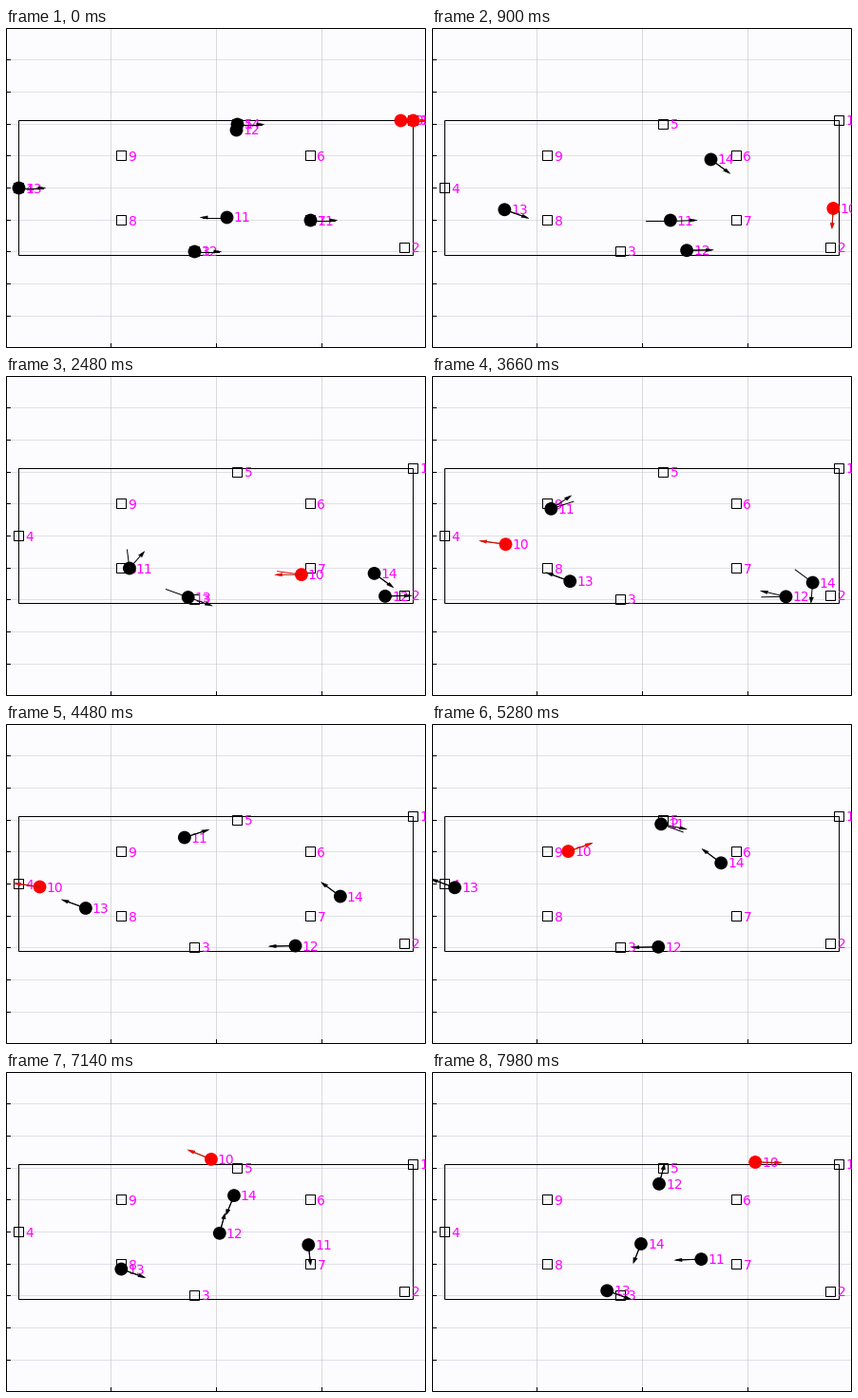
Write a matplotlib script that moves like this. It is 442 by 337 pixels and loops after 8000 ms.

```python
import math
import matplotlib.pyplot as plt
from matplotlib.animation import FuncAnimation
from matplotlib.patches import Circle, Polygon, Rectangle

W, H, DPI = 442, 337, 100
FRAMES, STEP = 400, 20
PX = 72 / DPI
PINK = "#ff00ff"
SPEED = 0.00375   # stage widths per frame, black agents
RATE = 0.0257     # share of the remaining way per frame, red agent
TURN = 0.18       # turning rate of every heading
REACH = 0.02      # a goal counts as met at this distance

NODES = {1: (428, 97), 2: (419, 231), 3: (198, 235), 4: (13, 168),
         5: (243, 101), 6: (320, 134), 7: (320, 202), 8: (121, 202),
         9: (121, 134)}

# agent: first node, goals as (node, frames to rest there), turning bias
PATROLS = {
    11: (7, [(8, 7), (9, 5), (5, 4), (6, 4), (7, 8), (8, 0)], 0),
    12: (3, [(2, 26), (3, 20), (5, 0)], 0.001),
    13: (4, [(3, 29), (4, 23), (3, 0)], 0.003),
    14: (5, [(2, 25), (5, 17), (5, 8), (3, 0)], -0.001),
}

# the red agent's goals as (place, distance at which it moves on)
CHASE = [(NODES[2], 0.0225), (NODES[4], 0.04), (NODES[5], 0.235),
         ((300, 82), 0.148), ((207, 88), 0.018), (NODES[1], 0)]


def walk(start, goals, pace, bias=0, rest=0):
    """States (x, y, aim, heading); goals are (place, reach, rest)."""
    x, y = start
    heading, k = 0.0, 0
    states = [(x, y, heading, heading)]
    while len(states) < FRAMES:
        (gx, gy), reach, pause = goals[k]
        dx, dy = (gx - x) / W, (y - gy) / H
        dist = math.hypot(dx, dy)
        if rest > 0:
            rest -= 1
        elif dist <= reach and k < len(goals) - 1:
            k, rest = k + 1, pause
        else:
            part = pace(dist) / dist
            x += (gx - x) * part
            y += (gy - y) * part
        (gx, gy), _, _ = goals[k]
        aim = math.atan2((y - gy) / H, (gx - x) / W)
        heading += TURN * (math.sin(aim - heading) + bias)
        states.append((x, y, aim, heading))
    return states


def ray(x, y, angle, along, side=0.0):
    c, s = math.cos(angle), math.sin(angle)
    return (x + W * (along * c - side * s), y - H * (along * s + side * c))


fig = plt.figure(figsize=(W / DPI, H / DPI), dpi=DPI, facecolor="#fcfcfe")
ax = fig.add_axes([0, 0, 1, 1])
ax.set_xlim(0, W)
ax.set_ylim(H, 0)
ax.axis("off")


def line(xs, ys, color="black", z=1, **kw):
    return ax.plot(xs, ys, color=color, lw=PX, zorder=z, **kw)[0]


def label(x, y, n):
    return ax.text(x + 7.5, y + 5.5, str(n), color=PINK, size=10,
                   family="DejaVu Sans", va="baseline", zorder=2,
                   clip_on=True)


class Agent:
    def __init__(self, n, arrow=True):
        color, edge = ("red", "#b01c08") if n == 10 else ("black", "black")
        self.dot = ax.add_patch(Circle((0, 0), 6.9, fc=color, lw=0, zorder=3))
        self.text = label(0, 0, n)
        self.aim = line([], [], color, 4)
        self.shaft = line([], [], edge, 4)
        self.head = ax.add_patch(Polygon([(0, 0)] * 3, fc=color, ec=edge,
                                         lw=0.3, zorder=4))
        self.arrow = [self.aim, self.shaft, self.head] if arrow else []
        self.parts = [self.dot, self.text] + self.arrow

    def place(self, x, y, aim, heading):
        x, y = x + 0.5, y + 0.5
        self.dot.center = (x, y)
        self.text.set_position((x + 7, y + 5))
        if not self.arrow:
            return
        for part, angle in ((self.aim, aim), (self.shaft, heading)):
            part.set_data(*zip((x, y), ray(x, y, angle, 0.058)))
        self.head.set_xy([ray(x, y, heading, 0.064),
                          ray(x, y, heading, 0.046, 0.005),
                          ray(x, y, heading, 0.046, -0.005)])

    def show(self, on):
        for part in self.parts:
            part.set_visible(on)


# grid, ticks and border
DOTS = (0, (1, 1))
for k in range(1, 4):
    x = round(k * W / 4)
    line([x, x], [0, H], "#b8b8b8", 0, ls=DOTS)
    line([x, x], [H - 5, H])
for k in range(1, 10):
    y = int(k * H / 10)
    line([0, W], [y, y], "#c4c4d4", 0, ls=DOTS)
    line([0, 4], [y, y])
ax.add_patch(Rectangle((0, 0), W - 1, H - 1, fill=False, lw=PX))

# area and nodes
ax.add_patch(Rectangle((13, 97), 415, 142, fill=False, lw=PX, zorder=1))
for n, (x, y) in NODES.items():
    ax.add_patch(Rectangle((x - 5, y - 5), 10, 10, fill=False, lw=PX,
                           zorder=2))
    label(x, y, n)

states = {10: walk(NODES[1], [(p, reach, 0) for p, reach in CHASE],
                   lambda dist: RATE * dist)}
for n, (first, goals, bias) in PATROLS.items():
    states[n] = walk(NODES[first], [(NODES[g], REACH, r) for g, r in goals],
                     lambda dist: SPEED, bias, rest=3)
agents = {n: Agent(n) for n in states}

# second set of agents, seen only at the very start
extras = [Agent(10), Agent(11), Agent(12, arrow=False)]
for agent, x, y, angle in zip(extras, (415, 232, 242), (97, 199, 107),
                              (0, math.pi, 0)):
    agent.place(x, y, angle, angle)


def draw(i):
    for n, agent in agents.items():
        agent.place(*states[n][i])
    for agent in extras:
        agent.show(i == 0)
    return []


anim = FuncAnimation(fig, draw, frames=FRAMES, interval=STEP, repeat=True,
                     repeat_delay=0, init_func=lambda: draw(0), blit=False)
plt.show()
```
